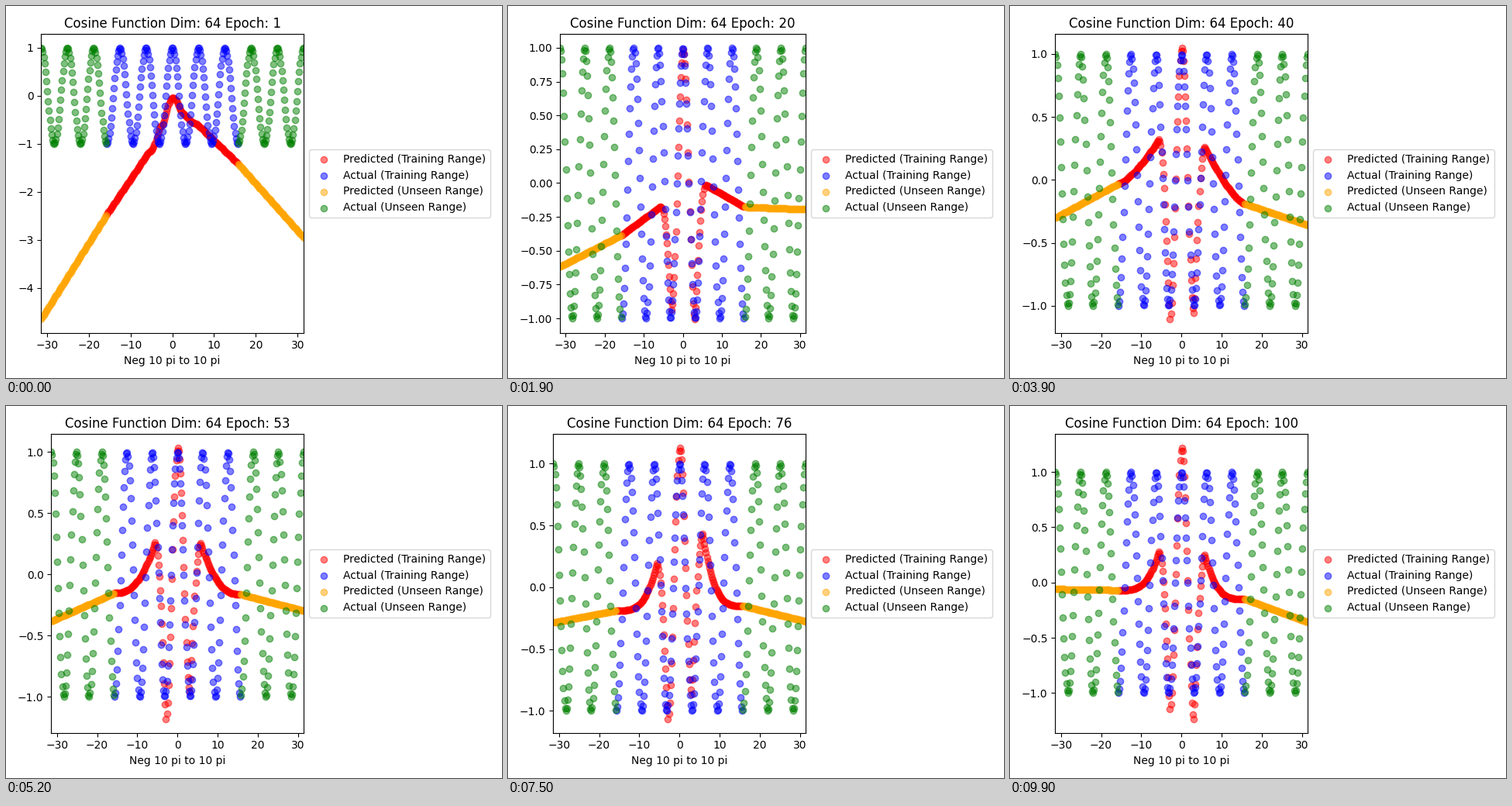
A matplotlib script for the animation above (10000 ms loop, 640x480 px).

```python
import numpy as np
import matplotlib.pyplot as plt
from matplotlib.animation import FuncAnimation

EPOCHS = 100
WELL, RIM, EDGE, END = 3, 5.7, 5 * np.pi, 10 * np.pi  # distances from the peak

# epoch: peak height, then (well, rim, edge, end) heights to the left and right
POSES = {
    1: (-.04, -.64, -1.17, -2.46, -4.64, -.40, -.58, -1.42, -2.96),
    13: (.98, -.77, -.50, -.93, -1.57, -1.03, -.10, -.17, -.26),
    23: (.98, -1.0, -.05, -.18, -.26, -1.0, .02, -.18, -.17),
    28: (.98, -1.24, .18, .20, .40, -1.17, .07, -.20, -.13),
    40: (1.05, -1.11, .32, -.03, -.30, -1.06, .26, -.19, -.36),
    67: (1.02, -1.26, .20, -.27, -.46, -.87, .25, -.14, -.24),
    85: (1.23, -.89, .19, -.11, -.12, -.86, .60, -.16, -.31),
    100: (1.22, -1.15, .28, -.07, -.06, -1.24, .25, -.15, -.36),
}


def pose(epoch):
    """Heights at an epoch; learning is quick at first, then steadies."""
    times = np.sqrt(list(POSES))
    return [np.interp(np.sqrt(epoch), times, col) for col in zip(*POSES.values())]


def side(d, power, peak, well, rim, edge, end):
    """Half of the learned curve at distance d from its peak."""
    fall = well + (peak - well) * (1 + np.cos(np.pi * d / WELL)) / 2
    rise = well + (rim - well) * np.sin(np.pi / 2 * (d - WELL) / (RIM - WELL))
    left = np.clip((EDGE - d) / (EDGE - RIM), 0, 1)
    settle = edge + (rim - edge) * left ** power
    tail = edge + (end - edge) * (d - EDGE) / (END - EDGE)
    return np.select([d < WELL, d < RIM, d < EDGE], [fall, rise, settle], tail)


def predict(epoch):
    peak, *heights = pose(epoch)
    power = np.clip(1 + (epoch - 35) / 12, 1, 3.5)  # tails flatten with training
    d = x - 0.1
    return np.where(d < 0, side(-d, power, peak, *heights[:4]),
                    side(d, power, peak, *heights[4:]))


x = np.linspace(-END, END, 300)
actual = np.cos(x)
seen = np.abs(x) <= EDGE

fig, ax = plt.subplots(figsize=(6.4, 4.8), dpi=100)


def dots(mask, y, color, label):
    return ax.scatter(x[mask], y[mask], color=color, alpha=0.5, label=label)


start = predict(1)
pred_seen = dots(seen, start, "red", "Predicted (Training Range)")
dots(seen, actual, "blue", "Actual (Training Range)")
pred_unseen = dots(~seen, start, "orange", "Predicted (Unseen Range)")
dots(~seen, actual, "green", "Actual (Unseen Range)")

ax.set_xlim(-END, END)
ax.set_xlabel("Neg 10 pi to 10 pi")
ax.legend(loc="center left", bbox_to_anchor=(1, 0.5))


def update(i):
    epoch = i + 1
    y = predict(epoch)
    pred_seen.set_offsets(np.c_[x[seen], y[seen]])
    pred_unseen.set_offsets(np.c_[x[~seen], y[~seen]])
    low, high = min(y.min(), actual.min()), max(y.max(), actual.max())
    pad = 0.05 * (high - low)
    ax.set_ylim(low - pad, high + pad)
    ax.set_title(f"Cosine Function Dim: 64 Epoch: {epoch}")
    fig.tight_layout(rect=(0, 0, 1, 1 + 1 / 480))
    return []


anim = FuncAnimation(fig, update, frames=EPOCHS, interval=100,
                     repeat=True, repeat_delay=0, blit=False)
plt.show()
```
